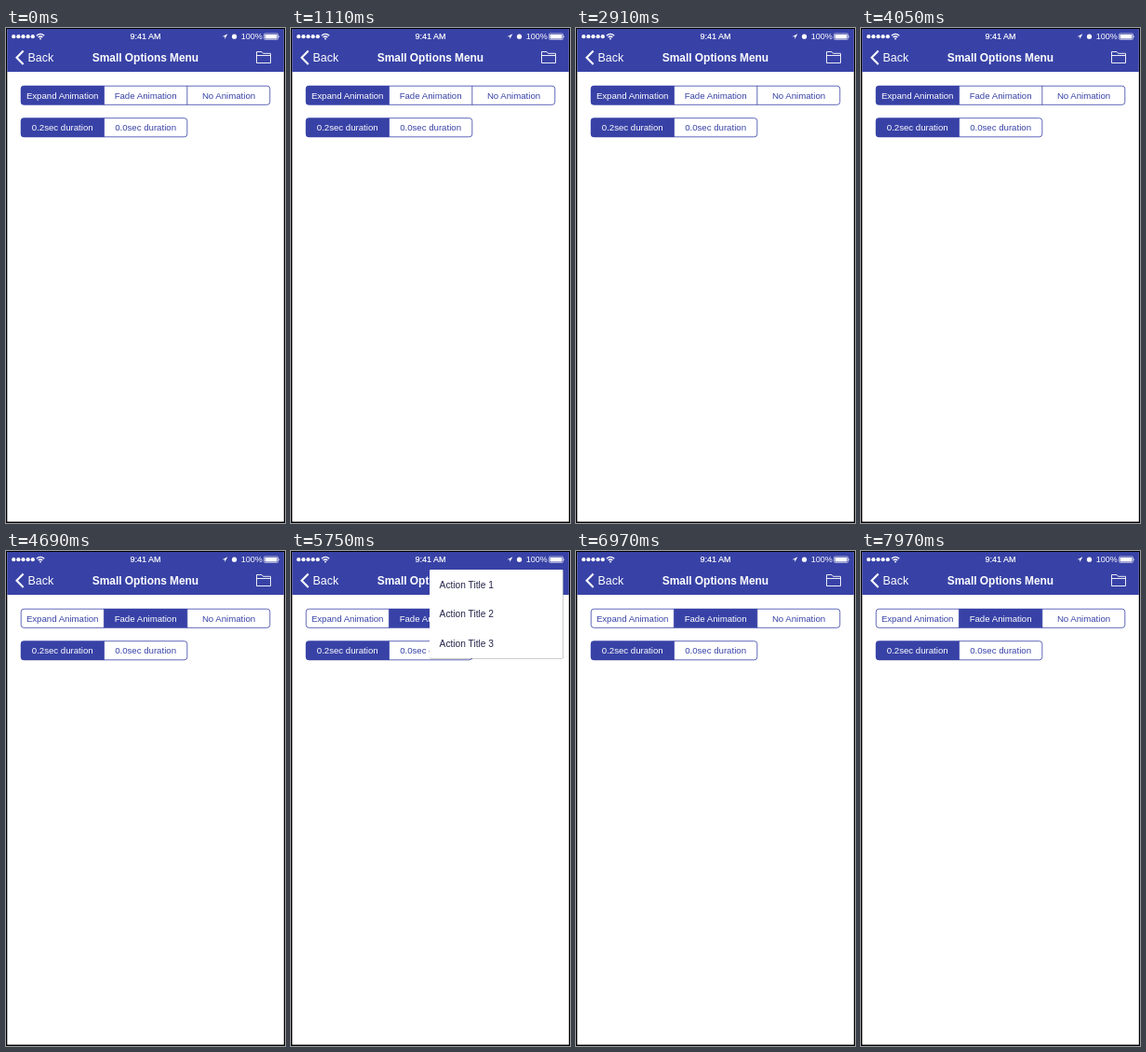
Animation of 300x531 px, one loop 8000 ms. Source, as an HTML page:

```html
<!DOCTYPE html>
<html lang="en">
<head>
<meta charset="utf-8">
<title>Small Options Menu</title>
<style>
html, body { margin: 0; width: 100%; height: 100%; overflow: hidden; background: #000; }
svg { display: block; width: 100%; height: 100%; }
text { font-family: "Liberation Sans", Arial, sans-serif; }
.seg { font-size: 9.65px; text-anchor: middle; }
.action { font-size: 10.2px; fill: #25254a; }
.status { font-size: 9px; fill: #fff; }
.line { fill: none; stroke: #fff; }
</style>
</head>
<body>
<svg id="stage" viewBox="0 0 300 531">
  <defs>
    <filter id="soft" x="-5%" y="-5%" width="110%" height="110%">
      <feGaussianBlur stdDeviation="0.7"/>
    </filter>
    <clipPath id="clipA"><rect x="16" y="62" width="268" height="20.5" rx="3"/></clipPath>
    <clipPath id="clipB"><rect x="16" y="96.5" width="179" height="20.5" rx="3"/></clipPath>
  </defs>
  <rect width="300" height="531" fill="#000"/>
  <rect x="1.3" y="1" width="297.5" height="528.6" fill="#fff"/>
  <rect x="1.3" y="1" width="297.5" height="46" fill="#3842a6"/>

  <g id="dots" fill="#fff"></g>
  <g class="line" stroke-width="1.3">
    <path d="M32.8 8.2Q37 4.6 41.2 8.2M34.6 10Q37 8 39.4 10"/>
  </g>
  <circle cx="37" cy="11.6" r="1" fill="#fff"/>
  <text class="status" x="150" y="12.4" text-anchor="middle" stroke="#fff" stroke-width=".2">9:41 AM</text>
  <path d="M238.3 6.2L232.5 9.2H235.3V12Z" fill="#fff"/>
  <circle cx="245.5" cy="9.2" r="2.6" fill="#fff"/>
  <text class="status" x="252.7" y="12.4">100%</text>
  <rect class="line" x="277.5" y="6" width="15" height="6.4" rx="1" stroke-width=".6"/>
  <rect x="278.5" y="7" width="13" height="4.4" rx=".4" fill="#fff"/>
  <path d="M293.4 8Q295 9.2 293.4 10.4Z" fill="#fff"/>

  <path class="line" d="M18.6 24.6L11.5 31.8L18.6 39" stroke-width="2.1"/>
  <text x="23.6" y="36" font-size="12.4" fill="#fff">Back</text>
  <text x="150" y="36" font-size="11.9" font-weight="bold" text-anchor="middle" fill="#fff">Small Options Menu</text>
  <path class="line" d="M269.5 37.5V25.5H275L276.5 27.3H284.5V37.5ZM269.5 29.5H284.5" stroke-width=".9"/>

  <g id="controls"></g>
  <g id="menu">
    <rect id="shade" x="149" y="20.3" width="143.5" height="95" rx="1" filter="url(#soft)"/>
    <g id="sheet">
      <rect x="149" y="20" width="143.5" height="95" rx="1" fill="#fff"/>
    </g>
  </g>
</svg>
<script>
const LOOP = 8000, TINT = '#3842a6';
const SELECT_AT = 4250;
const shows = [
  { kind: 'expand', open: 1200, openFor: 200, close: 2520, closeFor: 200 },
  { kind: 'fade', open: 4980, openFor: 200, close: 6360, closeFor: 160 }
];
const $ = id => document.getElementById(id);

function add(parent, tag, attrs, label) {
  const el = document.createElementNS('http://www.w3.org/2000/svg', tag);
  for (const key in attrs) el.setAttribute(key, attrs[key]);
  if (label) el.textContent = label;
  parent.append(el);
  return el;
}

function segmented(y, clip, labels) {
  const step = 89.4, width = Math.round(step * labels.length);
  const fill = add($('controls'), 'rect', {
    y, width: step, height: 20.5, fill: TINT, 'clip-path': `url(#${clip})`
  });
  add($('controls'), 'rect', {
    x: 16.2, y: y + .2, width: width - .4, height: 20.1, rx: 3,
    fill: 'none', stroke: TINT, 'stroke-width': .8
  });
  const texts = labels.map((label, i) => {
    const x = 16 + i * step;
    if (i) add($('controls'), 'path', { d: `M${x} ${y}v20.5`, stroke: TINT, 'stroke-width': .8 });
    return add($('controls'), 'text', { class: 'seg', x: x + step / 2, y: y + 13.5 }, label);
  });
  return chosen => {
    fill.setAttribute('x', 16 + chosen * step);
    texts.forEach((text, i) => text.setAttribute('fill', i === chosen ? '#fff' : TINT));
  };
}

for (let i = 0; i < 5; i++) add($('dots'), 'circle', { cx: 8.2 + i * 5.15, cy: 9.2, r: 2.1 });
const pickStyle = segmented(62, 'clipA', ['Expand Animation', 'Fade Animation', 'No Animation']);
const pickDuration = segmented(96.5, 'clipB', ['0.2sec duration', '0.0sec duration']);
pickDuration(0);
for (let i = 0; i < 3; i++) {
  add($('sheet'), 'text', { class: 'action', x: 159.6, y: 39.6 + i * 31.6 }, `Action Title ${i + 1}`);
}

function ease(t, start, length) {
  const p = Math.min(1, Math.max(0, (t - start) / length));
  return p * p * (3 - 2 * p);
}

function draw(t) {
  pickStyle(t < SELECT_AT ? 0 : 1);
  let scale = 1, alpha = 0;
  for (const s of shows) {
    const shown = ease(t, s.open, s.openFor) - ease(t, s.close, s.closeFor);
    if (shown <= 0) continue;
    if (s.kind === 'expand') {
      scale = shown;
      alpha = 1;
    } else {
      alpha = shown;
    }
  }
  $('menu').setAttribute('visibility', alpha ? 'visible' : 'hidden');
  // Grow from the top right corner.
  $('menu').setAttribute('transform', `translate(292.5 20) scale(${scale}) translate(-292.5 -20)`);
  // The shadow fades apart from the sheet, so it shows through as grey.
  $('shade').setAttribute('opacity', .78 * alpha);
  $('sheet').setAttribute('opacity', alpha);
}

const began = performance.now();
function tick() {
  draw((performance.now() - began) % LOOP);
  requestAnimationFrame(tick);
}
tick();
</script>
</body>
</html>
```
